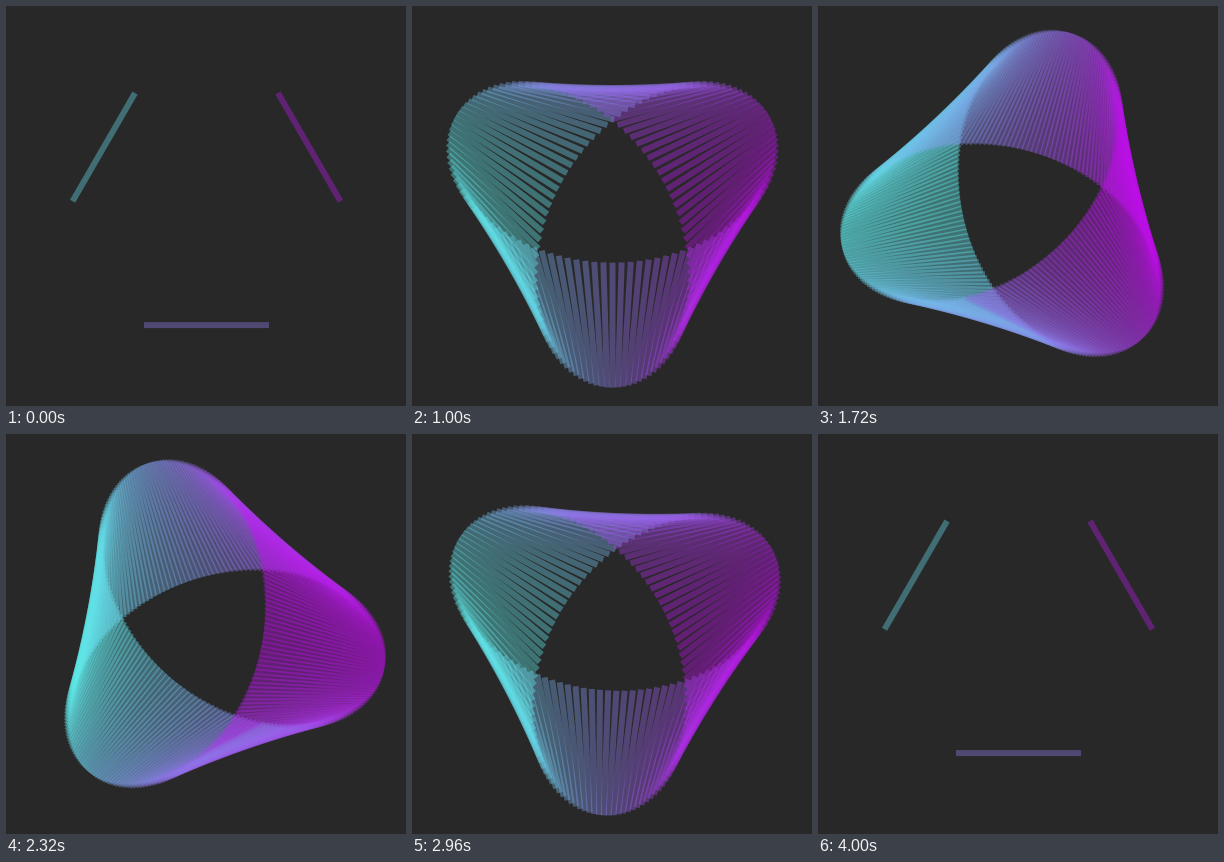
An HTML page with a canvas for the animation above (4040 ms loop, 400 by 400 pixels).

```html
<!DOCTYPE html>
<html>
<head>
<meta charset="utf-8">
<style>
html, body { margin: 0; width: 100%; height: 100%; overflow: hidden; background: #282828; }
canvas { display: block; }
</style>
</head>
<body>
<canvas id="stage" width="400" height="400"></canvas>
<script>
const ctx = document.getElementById('stage').getContext('2d');
const CENTER = 200.5, RADIUS = 118.6, LENGTH = 125, WIDTH = 6;
const STEP = 40, STEPS = 101;
const CYAN = [95, 230, 230], PURPLE = [185, 15, 228];
const TAU = Math.PI * 2;

const easeInOut = u => u < 0.5 ? 4 * u ** 3 : 1 - 4 * (1 - u) ** 3;
const mix = k => CYAN.map((c, i) => Math.round(c + (PURPLE[i] - c) * k));

function drawBar(angle, tilt) {
  const x = Math.cos(angle), y = Math.sin(angle);
  ctx.save();
  ctx.translate(CENTER + RADIUS * x, CENTER + RADIUS * y);
  ctx.rotate(tilt);
  ctx.fillStyle = `rgba(${mix((1 + x) / 2)}, 0.4)`;
  ctx.fillRect(-LENGTH / 2, -WIDTH / 2, LENGTH, WIDTH);
  ctx.restore();
}

function draw(t) {
  ctx.fillStyle = '#282828';
  ctx.fillRect(0, 0, 400, 400);
  // The ring fills up to 203 bars at mid-loop, then thins back to 3.
  const count = Math.floor(3 + 200 * easeInOut(1 - Math.abs(1 - 2 * t)));
  for (let i = 0; i < count; i++) {
    const turn = i / count * TAU;
    drawBar(TAU / 4 + turn, -turn / 2 - t * TAU);
  }
}

function tick() {
  const step = Math.floor(performance.now() / STEP) % STEPS;
  draw(step / (STEPS - 1));
  requestAnimationFrame(tick);
}
tick();
</script>
</body>
</html>
```
